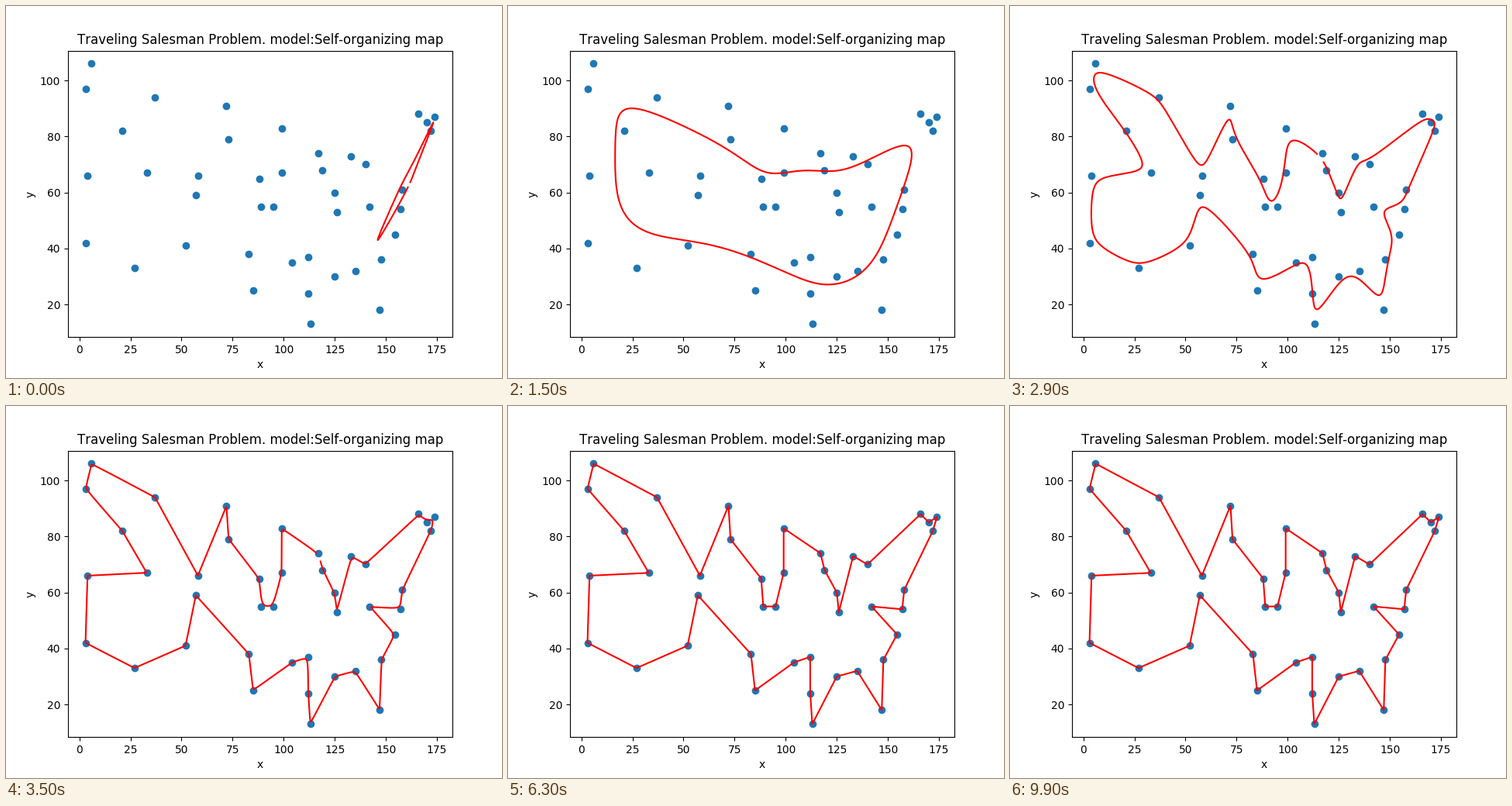
A matplotlib script that plays this animation: 640 px wide and 480 px high, repeating every 10 s.

```python
import numpy as np
import matplotlib.pyplot as plt
from matplotlib.animation import FuncAnimation

FRAMES, INTERVAL, NODES = 100, 100, 1200
plt.rcParams["text.kerning_factor"] = 6

# Cities in the order of the final tour
CITIES = np.array([
    (119, 68), (125, 60), (126, 53), (133, 73), (140, 70), (166, 88),
    (170, 85), (174, 87), (172, 82), (158, 61), (157, 54), (142, 55),
    (154.5, 45), (147.8, 36), (147, 18), (135, 32), (125, 30), (113, 13),
    (112, 24), (112, 37), (104, 35), (85, 25), (83, 38), (57, 59),
    (52, 41), (27, 33), (3, 42), (4, 66), (33, 67), (21, 82), (3, 97),
    (6, 106), (37, 94), (58, 66), (72, 91), (73, 79), (88, 65), (89, 55),
    (95, 55), (99, 67), (99, 82.9), (117, 74)])

# Early outlines of the ring, clockwise from the same place as the tour
SLIVER = np.array([(164.3, 72), (173.2, 85), (166.1, 71.5), (161, 62.2),
                   (146, 43), (156.5, 61)])
LOOP = np.array([(118, 67.9), (140, 66.9), (155, 68.3), (164.2, 71.1),
                 (152, 52), (134.4, 36.8), (113, 30.8), (85, 37.3),
                 (56, 46), (35, 52.7), (28, 60.5), (40, 70.3), (65, 72.2)])

# Place of each city along the ring: lonely cities get more room
room = np.sqrt(np.hypot(*(CITIES - np.roll(CITIES, 1, 0)).T))
PLACE = np.cumsum(room) - room[0] / 2
TOTAL = room.sum()


def spline(p, u):
    """Closed centripetal Catmull-Rom curve, u in 0..1 along its length."""
    n = len(p)
    step = np.roll(p, -1, 0) - p
    dist = np.hypot(*step.T)
    h = np.sqrt(dist)[:, None]
    slope = step / h
    h0, slope0 = np.roll(h, 1, 0), np.roll(slope, 1, 0)
    m = (slope0 * h + slope * h0) / (h + h0)
    ends = np.concatenate([[0], np.cumsum(dist)])
    s = np.interp(u % 1 * ends[-1], ends, np.arange(n + 1))
    i = np.minimum(s.astype(int), n - 1)
    j = (i + 1) % n
    t = (s - i)[:, None]
    return ((1 + 2 * t) * (1 - t) ** 2 * p[i] + t * (1 - t) ** 2 * h[i] * m[i]
            + t * t * (3 - 2 * t) * p[j] - t * t * (1 - t) * h[i] * m[j])


def settled(u, sigma):
    """Tour blurred by a Gaussian neighbourhood of width sigma."""
    d = u[:, None] * TOTAL - PLACE
    d -= TOTAL * np.round(d / TOTAL)
    g = np.exp(-d ** 2 / (2 * sigma ** 2))
    return g @ CITIES / g.sum(1, keepdims=True)


def ring(frame):
    # The open ends of the ring wander along it and finally meet
    seam = np.interp(frame, [0, 8, 15, 23], [0.41, 0.307, -0.077, -0.007])
    gap = np.interp(frame, [0, 8, 15, 23, 35, 45],
                    [0.02, 0.0065, 0.003, 0.006, 0.0127, 0])
    u = seam + np.linspace(gap / 2, 1 - gap / 2, NODES)
    if frame < 8:
        w = frame / 8
        return spline(SLIVER, u) * (1 - w) + spline(LOOP, u) * w
    sigma = max(4.2 * np.exp(-0.085 * (frame - 23)), 0.5)
    w = min((frame - 8) / 7, 1)
    return spline(LOOP, u) * (1 - w) + settled(u, sigma) * w


fig, ax = plt.subplots(figsize=(6.4, 4.8), dpi=100)
ax.scatter(*CITIES.T)
line, = ax.plot([], [], "r-")
ax.set(xlim=(-5.55, 182.55), ylim=(8.35, 110.65), xlabel="x", ylabel="y",
       title="Traveling Salesman Problem. model:Self-organizing map")


def update(frame):
    line.set_data(*ring(frame).T)
    return line,


anim = FuncAnimation(fig, update, frames=FRAMES, interval=INTERVAL,
                     repeat=True, repeat_delay=0)
plt.show()
```
